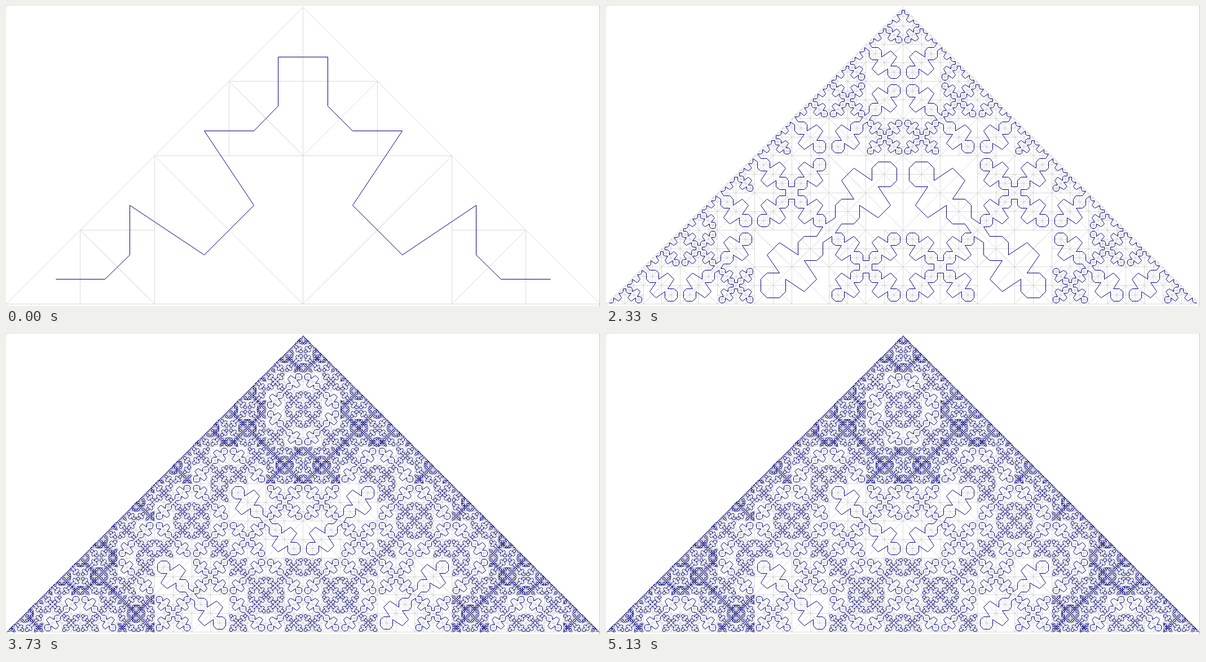
An HTML page with a canvas for the animation above (5190 ms loop, 1053 by 532 pixels).

```html
<!DOCTYPE html>
<html lang="en">
<head>
<meta charset="utf-8">
<title>Space-filling triangle curve</title>
<style>
  html, body { margin: 0; width: 100%; height: 100%; overflow: hidden; background: #fff; }
  canvas { display: block; }
</style>
</head>
<body>
<canvas id="stage" width="1053" height="532"></canvas>
<script>
const WIDTH = 1053, HEIGHT = 532, LOOP = 5190;
const STAGE_STARTS = [0, 1530, 2330, 3330];
const CENTER = 526.75, BASE = 528.75, HALF = 526.5;

const midpoint = (p, q) => [(p[0] + q[0]) / 2, (p[1] + q[1]) / 2];
const snap = v => Math.floor(v) + 0.5;

// A triangle is [entry, exit, corner]: its hypotenuse ends and its right angle.
function quarter([entry, exit, corner]) {
  const middle = midpoint(entry, exit);
  const near = midpoint(entry, corner), far = midpoint(corner, exit);
  return [
    [entry, middle, near],
    [middle, corner, near],
    [corner, middle, far],
    [middle, exit, far]
  ];
}

// Quarter a triangle, then quarter its two outer parts again.
function refine(triangle) {
  const [first, second, third, last] = quarter(triangle);
  return [...quarter(first), second, third, ...quarter(last)];
}

function addLine(ctx, points) {
  points.forEach(([x, y], i) => ctx[i ? 'lineTo' : 'moveTo'](snap(x), snap(y)));
}

function renderStage(triangles) {
  const canvas = document.createElement('canvas');
  canvas.width = WIDTH;
  canvas.height = HEIGHT;
  const ctx = canvas.getContext('2d');
  ctx.fillStyle = '#fff';
  ctx.fillRect(0, 0, WIDTH, HEIGHT);

  ctx.strokeStyle = '#dadada';
  ctx.beginPath();
  for (const triangle of triangles) {
    addLine(ctx, triangle);
    ctx.closePath();
  }
  ctx.stroke();

  ctx.strokeStyle = '#000080';
  ctx.beginPath();
  addLine(ctx, triangles.map(([a, b, c]) =>
    [(a[0] + b[0] + c[0]) / 3, (a[1] + b[1] + c[1]) / 3]));
  ctx.stroke();

  // Thin window edge with dark corner pixels.
  ctx.fillStyle = '#ccc';
  ctx.fillRect(WIDTH - 1, 0, 1, HEIGHT);
  ctx.fillStyle = '#667';
  for (const x of [0, WIDTH - 1])
    for (const y of [0, HEIGHT - 1]) ctx.fillRect(x, y, 1, 1);
  return canvas;
}

const left = [CENTER - HALF, BASE], right = [CENTER + HALF, BASE];
const top_ = [CENTER, BASE - HALF], foot = [CENTER, BASE];
let triangles = [[left, top_, foot], [top_, right, foot]];
const stages = STAGE_STARTS.map(() => {
  triangles = triangles.flatMap(refine);
  return renderStage(triangles);
});

const screen2d = document.getElementById('stage').getContext('2d');
const start = performance.now();
let shown = -1;

function draw() {
  const time = (performance.now() - start) % LOOP;
  const index = STAGE_STARTS.filter(t => t <= time).length - 1;
  if (index !== shown) {
    screen2d.drawImage(stages[index], 0, 0);
    shown = index;
  }
  requestAnimationFrame(draw);
}
draw();
</script>
</body>
</html>
```
